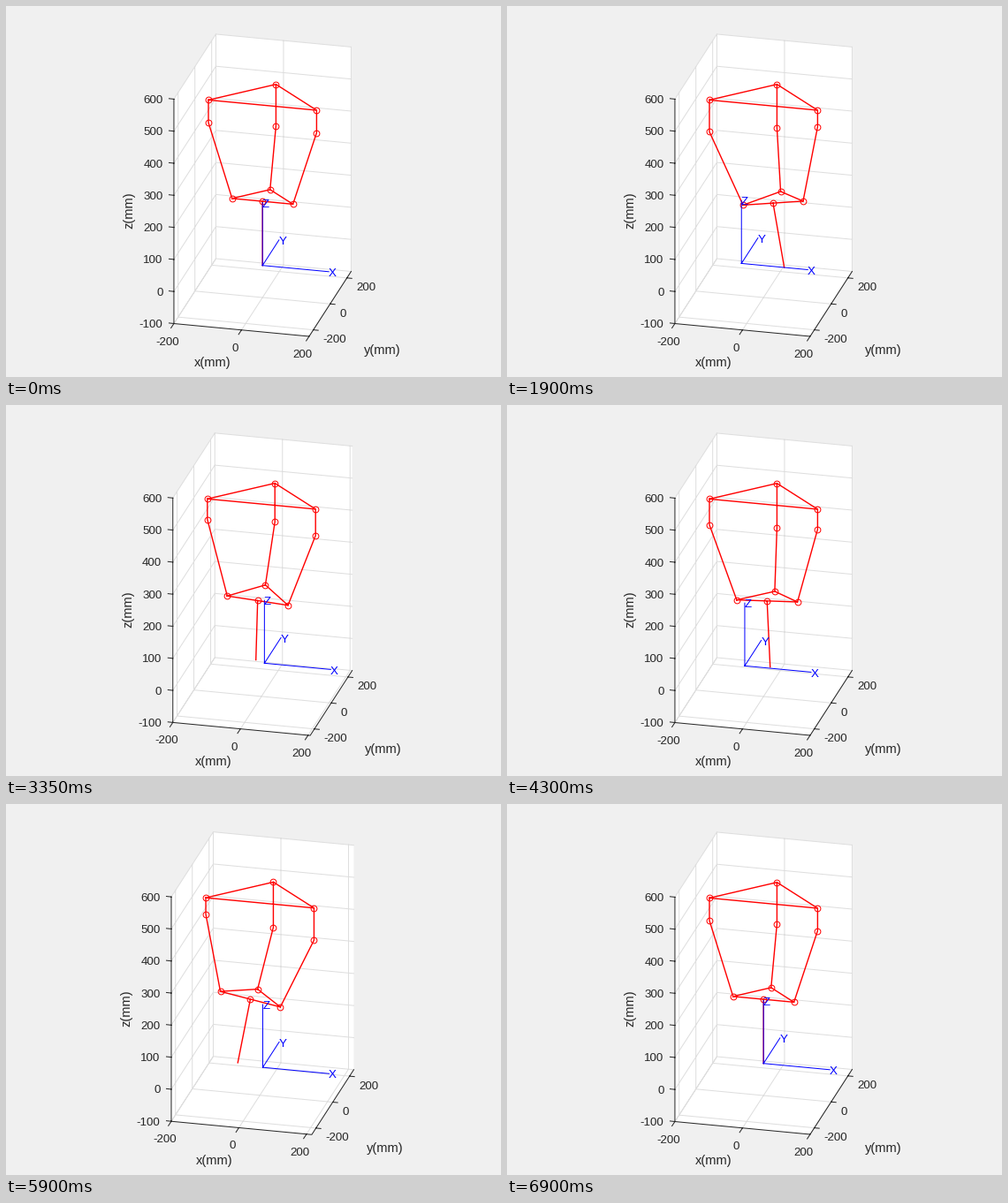
A matplotlib script for the animation above (6950 ms loop, 560 by 420 pixels).

```python
import numpy as np
import matplotlib.pyplot as plt
from matplotlib.animation import FuncAnimation

W, H, DPI = 560, 420, 100
PX = 72 / DPI
STEP_MS, HOLD, STEPS = 50, 19, 119
INK, RED, BLUE = "#262626", "#ff0000", "#0000ff"

# Orthographic view: screen pixels per millimetre along each axis
ORIGIN = np.array([290.2, 293.7])
VIEW = np.array([[0.3825, 0.0362], [0.095, -0.147], [0.0, -0.363]])

X_LO, X_HI, Y_LO, Y_HI, Z_LO, Z_HI = -200, 200, -250, 250, -100, 600
X_TICKS = Y_TICKS = (-200, 0, 200)
Z_TICKS = range(-100, 601, 100)

# Machine dimensions in millimetres
BASE_R, BASE_Z, PLATE_R = 160, 500, 90
SIDE_LINK, BACK_LINK, TOOL = 240, 184, 200
TRIAD = 196


def wave(phase, sines, cosines=()):
    """Sum of harmonics that starts and ends the cycle at zero."""
    total = sum(a * np.sin(n * phase) for n, a in enumerate(sines, 1))
    return total + sum(b * (np.cos(n * phase) - 1) for n, b in enumerate(cosines, 1))


def table_at(phase):
    x = wave(phase, (-18.3, -27, 13.2, -1.6, 2.5), (4, 3.4, 3.8, 5.9, 2.6))
    y = wave(phase, (24, -8), (3, 8.5))
    return np.array([x, y, 0])


def machine(phase):
    """Joint positions: base corners, sliders, plate corners, plate centre, tip."""
    # Tool tilts about y and x, as sines
    sa = wave(phase, (0.116, 0.087, -0.044, 0.006))
    sb = wave(phase, (0.11, -0.077), (-0.013, 0.033, -0.0075))
    ca, cb = np.sqrt(1 - sa * sa), np.sqrt(1 - sb * sb)
    ex, ey, up = np.array([[ca, 0, sa], [0, 1, 0], [-sa, 0, ca]])

    # The back leg stays in the plate's mid plane, which fixes the sideways shift
    rise = PLATE_R * sb + np.sqrt(BACK_LINK ** 2 - (BASE_R - PLATE_R * cb) ** 2)
    centre = np.array([rise * sa, 0, TOOL * ca * cb])
    tip = centre + TOOL * (sb * ey - cb * up)
    plate = [centre - PLATE_R * ex, centre + PLATE_R * (cb * ey + sb * up),
             centre + PLATE_R * ex]

    def side_height(p):
        return p[2] + np.sqrt(SIDE_LINK ** 2 - (BASE_R - abs(p[0])) ** 2)

    heights = [side_height(plate[0]), centre[2] + rise * ca, side_height(plate[2])]
    feet = [(-BASE_R, 0), (0, BASE_R), (BASE_R, 0)]
    base = [(x, y, BASE_Z) for x, y in feet]
    sliders = [(x, y, z) for (x, y), z in zip(feet, heights)]
    return base, sliders, plate, centre, tip


fig = plt.figure(figsize=(W / DPI, H / DPI), dpi=DPI, facecolor="#f0f0f0")
ax = fig.add_axes([0, 0, 1, 1])
ax.set_xlim(0, W)
ax.set_ylim(H, 0)
ax.axis("off")


def pen(color, width, **style):
    return ax.plot([], [], color=color, lw=width * PX, **style)[0]


def label(text, size=13.33, color=INK, **style):
    return ax.text(0, 0, text, fontsize=size * PX, color=color,
                   family="Liberation Sans", va="center", **style)


def draw(line, paths):
    """Put several open paths into one line artist."""
    gap = [[np.nan, np.nan]]
    xy = np.vstack([part for p in paths for part in (np.asarray(p), gap)])
    line.set_data(xy[:, 0], xy[:, 1])


wall = ax.fill([0, 1, 1], [0, 0, 1], color="white", lw=0)[0]
grid = pen("#dedede", 1)
frame_lines = pen(INK, 1)
links = pen(RED, 1.4, solid_joinstyle="round")
joints = pen(RED, 0, ls="", marker="o", ms=6.8 * PX, mfc="none", mec=RED, mew=PX)
triad = pen(BLUE, 1)

x_labels = [label(str(v), ha="center") for v in X_TICKS]
y_labels = [label(str(v), ha="left") for v in Y_TICKS]
z_labels = [label(str(v), ha="right") for v in Z_TICKS]
x_title = label("x(mm)", 14.67, ha="center")
y_title = label("y(mm)", 14.67, ha="center")
z_title = label("z(mm)", 14.67, ha="center", rotation=90)
triad_labels = [label(c, color=BLUE, ha="left") for c in "XYZ"]


def update(i):
    phase = 2 * np.pi * max(0, i - HOLD) / STEPS
    table = table_at(phase)
    extra = max(0.0, table[0])  # the x range grows with the table frame
    hi = X_HI + extra
    origin = ORIGIN - VIEW[0] * extra / 2
    shift = VIEW[0, 0] * extra / 2

    def project(*points):
        return np.asarray(points, float) @ VIEW + origin

    wall.set_xy(project((X_LO, Y_LO, Z_HI), (X_LO, Y_HI, Z_HI), (hi, Y_HI, Z_HI),
                        (hi, Y_HI, Z_LO), (hi, Y_LO, Z_LO), (X_LO, Y_LO, Z_LO)))

    rules = [project((x, Y_LO, Z_LO), (x, Y_HI, Z_LO), (x, Y_HI, Z_HI)) for x in X_TICKS]
    rules += [project((hi, y, Z_LO), (X_LO, y, Z_LO), (X_LO, y, Z_HI)) for y in Y_TICKS]
    rules += [project((X_LO, Y_LO, z), (X_LO, Y_HI, z), (hi, Y_HI, z)) for z in Z_TICKS]
    draw(grid, rules)

    edges = [project((X_LO, Y_LO, Z_HI), (X_LO, Y_LO, Z_LO), (hi, Y_LO, Z_LO),
                     (hi, Y_HI, Z_LO))]
    x_marks = project(*[(x, Y_LO, Z_LO) for x in X_TICKS])
    y_marks = project(*[(hi, y, Z_LO) for y in Y_TICKS])
    z_marks = project(*[(X_LO, Y_LO, z) for z in Z_TICKS])
    for marks, tick, texts, offset in (
            (x_marks, (-3.3, 5), x_labels, (-7.3, 21)),
            (y_marks, (5.5, 0.5), y_labels, (10.8, 11.5)),
            (z_marks, (-5.5, -0.6), z_labels, (-12.5, 1.5))):
        edges += [[p, p + tick] for p in marks]
        for text, p in zip(texts, marks):
            text.set_position(p + offset)
    draw(frame_lines, edges)
    x_title.set_position((234 + 0.7 * shift, 404.2))
    y_title.set_position((425.3 + shift, 389.8))
    z_title.set_position((139.3 - shift, 231.5))

    base, sliders, plate, centre, tip = machine(phase)
    top, mid, low = project(*base), project(*sliders), project(*plate)
    rod = project(centre, tip)
    draw(links, [top[[0, 1, 2, 0]], low[[0, 1, 2, 0]], rod, *zip(top, mid, low)])
    joints.set_data(*np.vstack([top, mid, low, rod[:1]]).T)

    root = project(table)[0]
    ends = project(*(table + TRIAD * np.eye(3)))
    draw(triad, [[root, e] for e in ends])
    for text, e in zip(triad_labels, ends):
        text.set_position(e + (-0.3, 2.2))
    return []


anim = FuncAnimation(fig, update, frames=HOLD + STEPS + 1, interval=STEP_MS,
                     repeat=True, repeat_delay=0)
plt.show()
```
